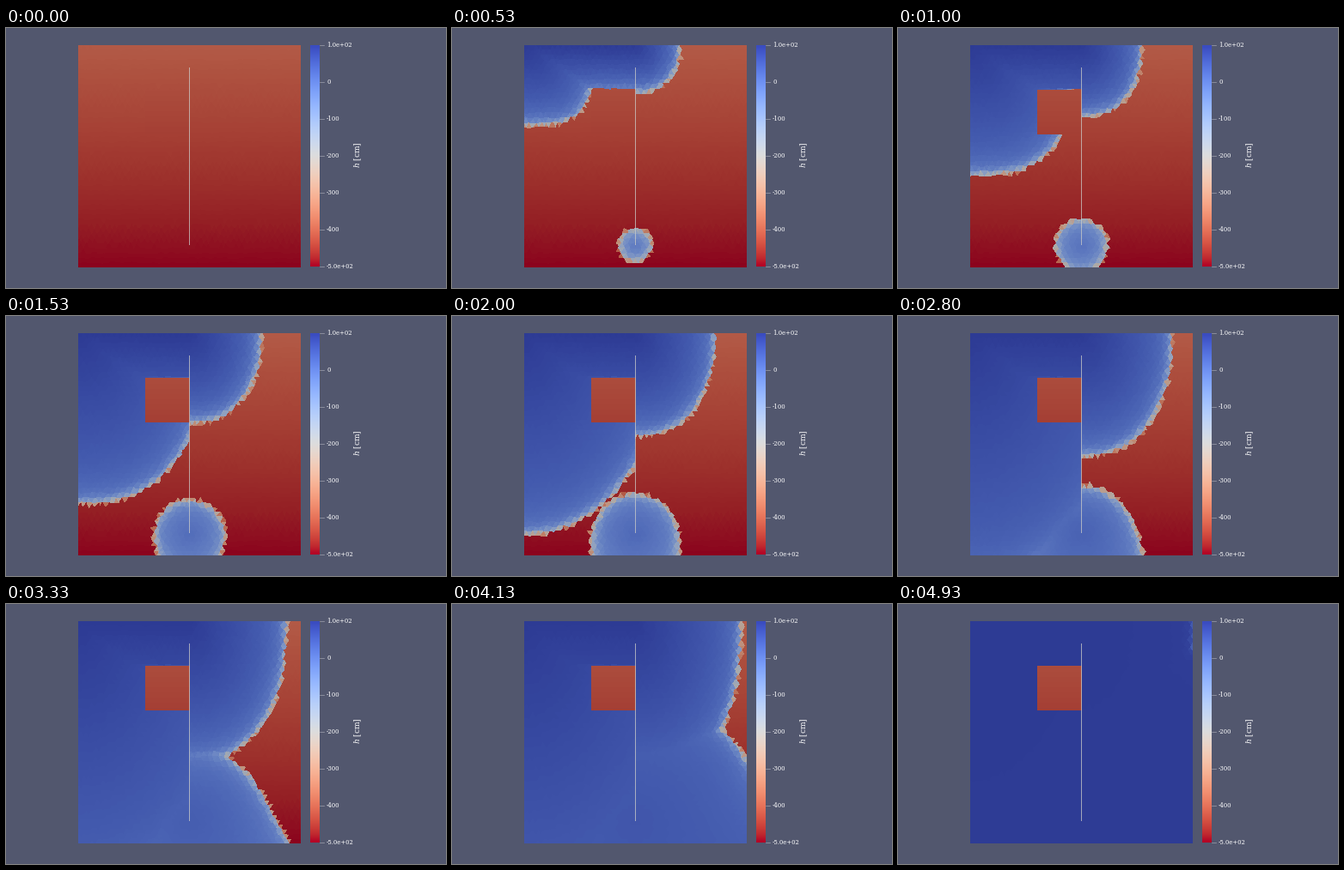
Animation, 512 px wide and 303 px high, one loop 4.99 s. Source, as a matplotlib script:

```python
import numpy as np
import matplotlib as mpl
import matplotlib.pyplot as plt
from matplotlib.animation import FuncAnimation
from matplotlib.colors import ListedColormap
from matplotlib.tri import Triangulation

W, H, DPI = 512, 303, 100
FRAMES, LOOP = 75, 4990
X0, Y0, SIZE = 84, 20, 259
X1, Y1 = X0 + SIZE, Y0 + SIZE
XM = X0 + SIZE / 2                      # vertical barrier
INLET_Y = Y0 + 0.9 * SIZE               # lower injection point
BX0, BY0, BY1 = X0 + 0.3 * SIZE, Y0 + 0.2 * SIZE, Y0 + 0.4 * SIZE


def half_mesh(xa, xb, rng, cols=20, rows=46, jitter=0.13):
    """Nearly equilateral triangles, slightly irregular inside."""
    pts = []
    for j in range(rows + 1):
        u = np.arange(cols + 1.0)
        if j % 2:
            u = np.r_[0, np.arange(cols) + 0.5, cols]
        v = np.full(len(u), float(j))
        if 0 < j < rows:
            u[1:-1] += rng.uniform(-jitter, jitter, len(u) - 2)
            v[1:-1] += rng.uniform(-jitter, jitter, len(u) - 2)
        pts.append(np.column_stack([xa + (xb - xa) * u / cols,
                                    Y0 + SIZE * v / rows]))
    pts = np.vstack(pts)
    return pts, Triangulation(*pts.T).triangles


rng = np.random.default_rng(4)
pl, tl = half_mesh(X0, XM, rng)
pr, tr = half_mesh(XM, X1, rng)
pts = np.vstack([pl, pr])
tris = np.vstack([tl, tr + len(pl)])
x, y = pts[tris].mean(axis=1).T         # cell centres


def dry_head(y):
    return -500 + 100 * (Y1 - y) / SIZE


def rho(dx, dy, a, b, p):
    """Superellipse radius: 0 at the centre, 1 on the front."""
    return ((dx / a) ** p + (dy / b) ** p) ** (1 / p)


def wet_head(r, scale, top, fall, fade):
    d = np.maximum(1 - r, 0) * scale    # distance behind the front
    h = top - fall * r
    h = h + (100 - h) * fade - 330 * np.exp(-d / 3)
    h = h - 60 * (1 - fade) * np.exp(-d / 16)
    return np.where(r < 1, h, -1000)


def head(t):
    t = max(t, 1e-6)
    late = max(t - 2.8, 0)              # faster once the fronts join
    fade = 0.93 * np.clip((t - 4) / 0.9, 0, 1) ** 1.5

    # water from the top, left of the barrier
    a, b = 122 * t ** 0.5, 153 * t ** 0.63
    r = rho(x - X0, y - Y0, a, b, max(2, 4 - t))
    left = wet_head(r, np.sqrt(a * b), 100, 75, fade)
    left[x > XM] = -1000

    # water from the top, right of the barrier and above the block
    a, b = 72 * t ** 0.385, 85 * t ** 0.52 + 14 * late
    r = rho(np.maximum(x - XM, 0), y - Y0, a, b, 2.3)
    right = wet_head(r, np.sqrt(a * b), 100, 75, fade)
    right[(x < XM) & (y > BY0)] = -1000

    # bulb around the inlet, flaring along the bottom
    size = 32 * t ** 0.56 + 46 * late + 7 * late ** 3
    flare = np.clip(0.25 * (t - 1), 0, 0.4) * np.clip((y - 180) / 100, 0, 1) ** 2.5
    r = np.hypot(x - XM, y - INLET_Y) / (size * (1 + flare))
    bulb = wet_head(r, size, 5 + 14 * (t - 1), 27, fade)

    return np.max([left, right, bulb, dry_head(y)], axis=0)


mpl.rcParams["font.family"] = "DejaVu Serif"
mpl.rcParams["mathtext.fontset"] = "dejavuserif"
bright = mpl.colormaps["coolwarm_r"]
shaded = ListedColormap(bright(np.linspace(0, 1, 256))[:, :3] * 0.77)

fig = plt.figure(figsize=(W / DPI, H / DPI), dpi=DPI, facecolor=(0.32, 0.34, 0.43))
ax = fig.add_axes([0, 0, 1, 1])
ax.axis("off")

field = ax.tripcolor(Triangulation(*pts.T, tris), facecolors=head(0),
                     cmap=shaded, vmin=-500, vmax=100)


def ramp(values, extent, cmap):
    ax.imshow(values[:, None], extent=extent, cmap=cmap, vmin=-500, vmax=100,
              aspect="auto", interpolation="nearest", zorder=2)


ramp(dry_head(np.linspace(BY0, BY1, 52)), (BX0, XM, BY1, BY0), shaded)
ramp(np.linspace(100, -500, 258), (354, 365, 278, 20), bright)
ax.plot([XM, XM], [46, 253], color=(0.8, 0.8, 0.79), lw=0.72, alpha=0.75,
        solid_capstyle="butt", snap=False, zorder=3)

for k in range(7):
    value, ty = 100 - 100 * k, 20 + 43 * k
    label = f"{value:.1e}" if k in (0, 6) else str(value)
    ax.plot([365, 370], [ty, ty], color="white", lw=0.5, alpha=0.45)
    ax.text(373, ty - 0.7, label, color="white", size=6.9 * 0.72,
            va="center_baseline")
ax.text(410, 148.2, "$h$ [cm]", color="white", size=9 * 0.72, rotation=90,
        ha="center", va="center")
ax.set_xlim(0, W)
ax.set_ylim(H, 0)


def update(i):
    field.set_array(head(i / 15))
    return [field]


anim = FuncAnimation(fig, update, frames=FRAMES, interval=LOOP / FRAMES,
                     repeat=True, repeat_delay=0, blit=False)
plt.show()
```
